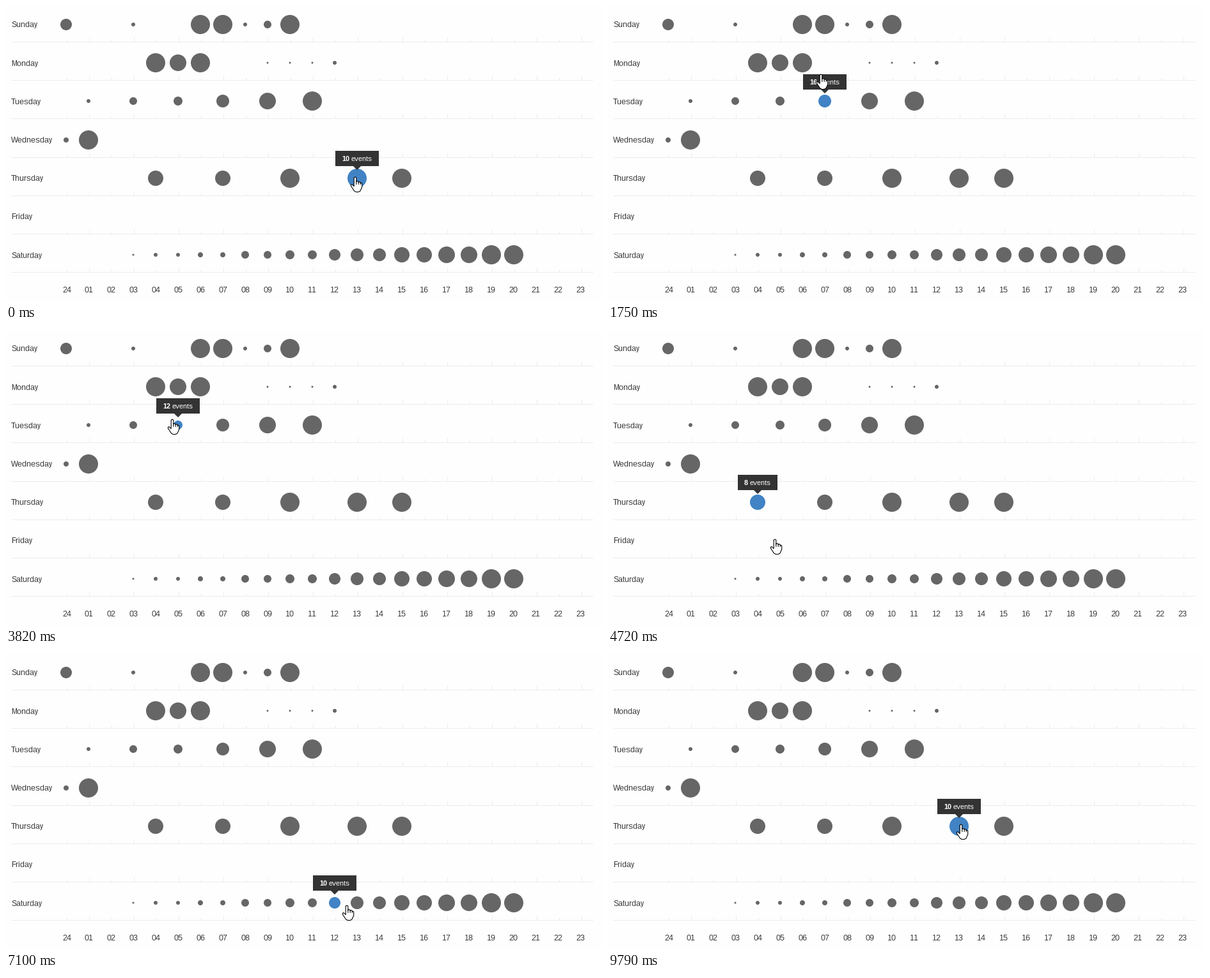
These frames come from a looping animation (932x464 px, 9890 ms). A matplotlib script:

```python
import numpy as np
import matplotlib.pyplot as plt
from matplotlib.animation import FuncAnimation
from matplotlib.collections import LineCollection
from matplotlib.patches import Circle, PathPatch, Polygon
from matplotlib.path import Path
from matplotlib.transforms import Affine2D

W, H, DPI = 932, 464, 64
PX = 72 / DPI                      # one pixel in points
FRAMES, STEP = 230, 43             # 9890 ms per loop
LAG = 90                           # delay between pointer and hover, ms
PITCH_X, PITCH_Y = 35, 60.2
GREY, BLUE, DARK, RULE = "#666666", "#4183c4", "#333333", "#ececec"

plt.rcParams.update({
    "font.family": "Liberation Sans",
    "text.hinting": "native",
    "text.hinting_factor": 1,
})

DAYS = ["Sunday", "Monday", "Tuesday", "Wednesday",
        "Thursday", "Friday", "Saturday"]
EVENTS = [
    {0: 6, 3: 2, 6: 10, 7: 10, 8: 2, 9: 4, 10: 10},
    {4: 40, 5: 36, 6: 40, 9: 4, 10: 4, 11: 4, 12: 8},
    {h: 2 * h + 2 for h in range(1, 12, 2)},
    {0: 3, 1: 10},
    {4: 8, 7: 8, 10: 10, 13: 10, 15: 10},
    {},
    {h: h - 2 for h in range(3, 21)},
]
RADII = [1.5, 3, 4, 6, 7, 9, 10, 12, 13, 15]

# pointer rests: arrival, departure, x, y of the fingertip
RESTS = [
    (0, 30, 546, 268), (1030, 1370, 414, 151), (1890, 2030, 308, 91),
    (2310, 2550, 270, 91), (2725, 3340, 233, 91), (3960, 4310, 268, 149),
    (5240, 5550, 270, 387), (6820, 7085, 525, 395), (8170, 8445, 787, 388),
    (9170, 9340, 621, 269), (9780, 9890, 552, 267),
]
# points passed on the way: time, x, y
VIA = [
    (300, 515, 250), (600, 452, 212), (795, 423, 178), (885, 417, 155),
    (1650, 355, 120), (3600, 243, 117), (4440, 256, 190), (4540, 246, 245),
    (4625, 249, 285), (4710, 261, 328), (5800, 300, 394), (6510, 437, 395),
    (6720, 503, 395), (7115, 533, 394), (7500, 640, 400), (7960, 779, 393),
    (8800, 700, 320), (9500, 585, 269),
]
knots = VIA + [(t, x, y) for a, b, x, y in RESTS for t in (a, b)]
knots = np.array(sorted(knots), float)
T, POS = knots[:, 0], knots[:, 1:]


def knot_slopes():
    """Harmonic-mean slopes: smooth, with no overshoot at the rests."""
    d = np.diff(POS, axis=0) / np.diff(T)[:, None]
    a, b = d[:-1], d[1:]
    same = a * b > 0
    m = np.zeros_like(POS)
    m[1:-1][same] = 2 * a[same] * b[same] / (a[same] + b[same])
    return m


SLOPES = knot_slopes()


def pointer(t):
    t = min(max(t, 0), T[-1])
    k = min(np.searchsorted(T, t, side="right"), len(T) - 1) - 1
    dt = T[k + 1] - T[k]
    u = (t - T[k]) / dt
    s = u * u * (3 - 2 * u)
    return (POS[k] * (1 - s) + POS[k + 1] * s
            + dt * u * (1 - u) * ((1 - u) * SLOPES[k] - u * SLOPES[k + 1]))


def cell_at(x, y):
    row = int(np.ceil((y - 55) / PITCH_Y))
    col = int((x - 76.5) // PITCH_X)
    return min(max(row, 0), 6), min(max(col, 0), 23)


def col_x(col):
    return 94 + PITCH_X * col


def row_y(first, row):
    return round(first + PITCH_Y * row)


def label(x, y, text, size=12, color=DARK, **kw):
    return ax.text(x, y, text, fontsize=size * PX, color=color,
                   va="baseline", **kw)


fig = plt.figure(figsize=(W / DPI, H / DPI), dpi=DPI, facecolor="#fefefe")
ax = fig.add_axes([0, 0, 1, 1])
ax.set_xlim(0, W)
ax.set_ylim(H, 0)
ax.axis("off")

# rules, ticks and labels
rules = []
for row, day in enumerate(DAYS):
    y = row_y(55, row) + 0.5
    rules.append([(8, y), (918, y)])
    for col in range(24):
        x = col_x(col) + 0.5
        rules.append([(x, y - (7 if col % 2 else 4)), (x, y)])
    label(8, row_y(33.4, row), day)
ax.add_collection(LineCollection(rules, colors=RULE, linewidths=PX, zorder=1))
for col in range(24):
    label(95 + 34.93 * col, 449, f"{col or 24:02d}", ha="center")

# event dots, ten sizes scaled to the busiest hour of the day
dots = {}
for row, day in enumerate(EVENTS):
    for col, n in day.items():
        level = -(-10 * n // max(day.values()))
        dot = Circle((col_x(col), row_y(29, row)), RADII[level - 1],
                     fc=GREY, lw=0, zorder=2)
        dots[row, col] = ax.add_patch(dot)

# tooltip
tip = ax.add_patch(Polygon([(0, 0), (1, 0), (1, 1)], fc=DARK, lw=0, zorder=3))
tip_num = label(0, 0, "", 11, "white", weight="bold", zorder=4)
tip_word = label(0, 0, "events", 11, "white", zorder=4)

# hand pointer, fingertip at the origin
HAND = [(-1.8, 1.4), (-0.8, 0.3), (0.8, 0.3), (1.8, 1.4), (1.8, 6.8),
        (4.3, 6.8), (5.2, 7.8), (7.4, 7.8), (8.3, 8.9), (10.7, 10),
        (10.7, 16), (7.8, 22.2), (5, 23.5), (1.2, 23.5), (-1.6, 21.8),
        (-6.6, 14), (-6.5, 12.2), (-5, 11.6), (-1.8, 14.6), (-1.8, 1.4)]
FOLDS = [[(x, y), (x, 11.8)] for x, y in (HAND[4], HAND[6], HAND[8])]
hand_path = Path.make_compound_path(Path(HAND), *map(Path, FOLDS))
hand = ax.add_patch(PathPatch(hand_path, fc="white", ec="black",
                              lw=1.1 * PX, joinstyle="round", zorder=5))
hand.set_snap(False)


def show_tip(row, col):
    num = str(EVENTS[row].get(col, 0))
    half = 28 + 3 * len(num)
    x, top = col_x(col), row_y(46.4 - PITCH_Y, row)
    left, right, base = x - half, x + half, top + 24
    tip.set_xy([(left, top), (right, top), (right, base), (x + 6, base),
                (x, base + 6), (x - 6, base), (left, base)])
    tip_num.set_text(num)
    tip_num.set_position((left + 10, top + 16))
    tip_word.set_position((left + 13 + 6 * len(num), top + 16))


def draw(i):
    t = i * STEP + STEP / 2
    cell = cell_at(*pointer(t - LAG))
    for key, dot in dots.items():
        dot.set_facecolor(BLUE if key == cell else GREY)
    show_tip(*cell)
    x, y = np.round(pointer(t))
    hand.set_transform(Affine2D().translate(x, y) + ax.transData)
    return [*dots.values(), tip, tip_num, tip_word, hand]


anim = FuncAnimation(fig, draw, frames=FRAMES, interval=STEP,
                     repeat=True, repeat_delay=0, cache_frame_data=False)
plt.show()
```
